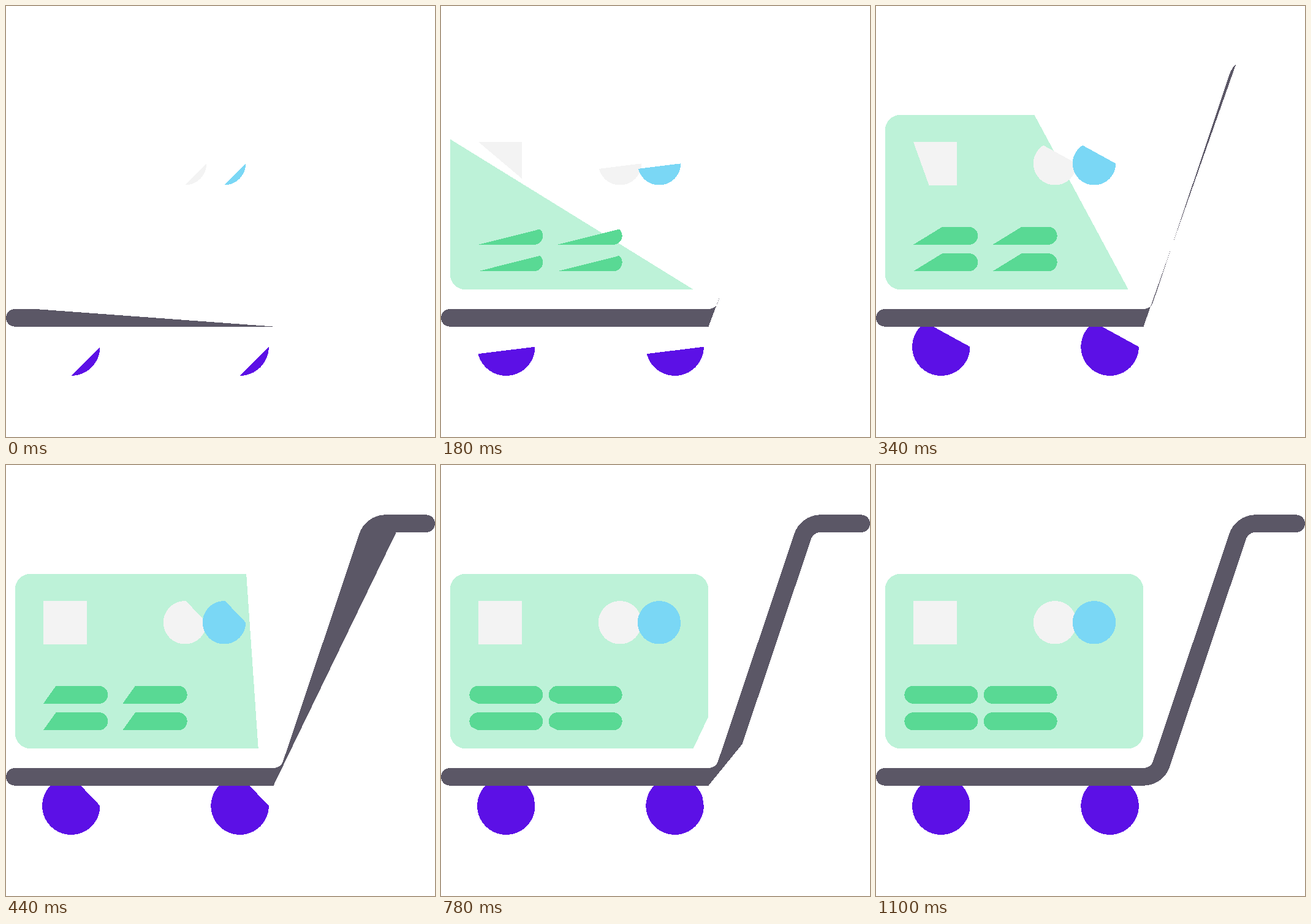
Write an HTML page that moves like this. It is 700 px wide and 704 px high and loops after 1.6 s.

```html
<!DOCTYPE html>
<html lang="en">
<head>
<meta charset="utf-8">
<title>Card on a trolley</title>
<style>
  html, body { margin: 0; width: 100%; height: 100%; overflow: hidden; background: #fff; }
  svg { display: block; width: 100%; height: 100%; }
</style>
</head>
<body>
<svg id="stage" viewBox="0 0 700 704" shape-rendering="crispEdges"></svg>
<script>
const LOOP = 1600, STEP = 20, DRAW_END = 1100;
const stage = document.getElementById('stage');
const shapes = [];

// An outline made of straight lines and arcs, measured by length.
class Outline {
  constructor(x, y) {
    this.points = [[x, y]];
    this.lengths = [0];
  }
  get total() { return this.lengths[this.lengths.length - 1]; }
  line(x, y) {
    const [px, py] = this.points[this.points.length - 1];
    this.lengths.push(this.total + Math.hypot(x - px, y - py));
    this.points.push([x, y]);
    return this;
  }
  arc(cx, cy, r, from, to) {
    const n = Math.ceil(Math.abs(to - from) / 2);
    for (let i = 0; i <= n; i++) {
      const a = (from + (to - from) * i / n) * Math.PI / 180;
      this.line(cx + r * Math.cos(a), cy + r * Math.sin(a));
    }
    return this;
  }
  trim(part) {
    const end = this.total * part;
    const out = [];
    for (let i = 0; i < this.points.length; i++) {
      const [x, y] = this.points[i];
      if (this.lengths[i] <= end) {
        out.push([x, y]);
        continue;
      }
      const [px, py] = this.points[i - 1];
      const k = (end - this.lengths[i - 1]) / (this.lengths[i] - this.lengths[i - 1]);
      out.push([px + (x - px) * k, py + (y - py) * k]);
      break;
    }
    return out.map(p => p.map(v => v.toFixed(2)).join()).join(' ');
  }
}

function add(fill, outline) {
  const el = document.createElementNS('http://www.w3.org/2000/svg', 'polygon');
  el.setAttribute('fill', fill);
  stage.append(el);
  shapes.push({ el, outline });
}

const circle = (cx, cy, r) => new Outline(cx + r, cy).arc(cx, cy, r, 0, 360);

const pill = (x, y, w, r) => new Outline(x + r, y + 2 * r)
  .arc(x + w - r, y + r, r, 90, -90)
  .arc(x + r, y + r, r, 270, 90);

function card(x1, y1, x2, y2, r) {
  return new Outline(x2 - r, y2)
    .arc(x1 + r, y2 - r, r, 90, 180)
    .arc(x1 + r, y1 + r, r, 180, 270)
    .arc(x2 - r, y1 + r, r, 270, 360)
    .arc(x2 - r, y2 - r, r, 0, 90);
}

function trolley() {
  const lean = 18.5, inner = 16.4, outer = 45, cap = 14.3;
  const low = [436.5, 478.6], high = [619.3, 126.4];
  return new Outline(436.5, 523.6)
    .arc(14.3, 509.3, cap, 90, 270)
    .arc(...low, inner, 90, lean)
    .arc(...high, outer, 180 + lean, 270)
    .arc(685.7, 95.7, cap, -90, 90)
    .arc(...high, inner, 270, 180 + lean)
    .arc(...low, outer, lean, 90);
}

for (const x of [106.3, 381.6]) add('#5c10e6', circle(x, 556.7, 47.2));
add('#5b5766', trolley());
add('#bdf2d8', card(15, 178, 436, 463, 24.3));
add('#f3f3f3', new Outline(61, 222).line(131.5, 222).line(131.5, 292.5).line(61, 292.5).line(61, 222));
add('#f3f3f3', circle(292, 257.3, 35.2));
add('#7ad7f5', circle(356, 257.3, 35.2));
for (const y of [360.8, 404.2]) {
  for (const x of [46.4, 175.8]) add('#59d994', pill(x, y, 119.8, 14.5));
}

// Smooth curve through [time, drawn part].
const keys = [[0, 0.25], [180, 0.461], [340, 0.66], [440, 0.7575], [620, 0.8838], [780, 0.9525], [DRAW_END, 1]];
const slopes = keys.map((_, i) => {
  if (i === 0) return 0.001;
  if (i === keys.length - 1) return 0;
  const [a, b] = [keys[i - 1], keys[i + 1]];
  return (b[1] - a[1]) / (b[0] - a[0]);
});

function drawnPart(t) {
  if (t >= DRAW_END) return 1;
  const i = keys.findIndex(k => k[0] > t) - 1;
  const [t0, a] = keys[i], [t1, b] = keys[i + 1];
  const d = t1 - t0, u = (t - t0) / d, v = 1 - u;
  return v * v * (1 + 2 * u) * a + u * u * (1 + 2 * v) * b
    + u * v * d * (v * slopes[i] - u * slopes[i + 1]);
}

function render(ms) {
  const t = Math.floor((ms % LOOP) / STEP) * STEP;
  const part = drawnPart(t);
  for (const { el, outline } of shapes) el.setAttribute('points', outline.trim(part));
}

let start = null;
function tick(now) {
  if (start === null) start = now;
  render(now - start);
  requestAnimationFrame(tick);
}
render(0);
requestAnimationFrame(tick);
</script>
</body>
</html>
```
